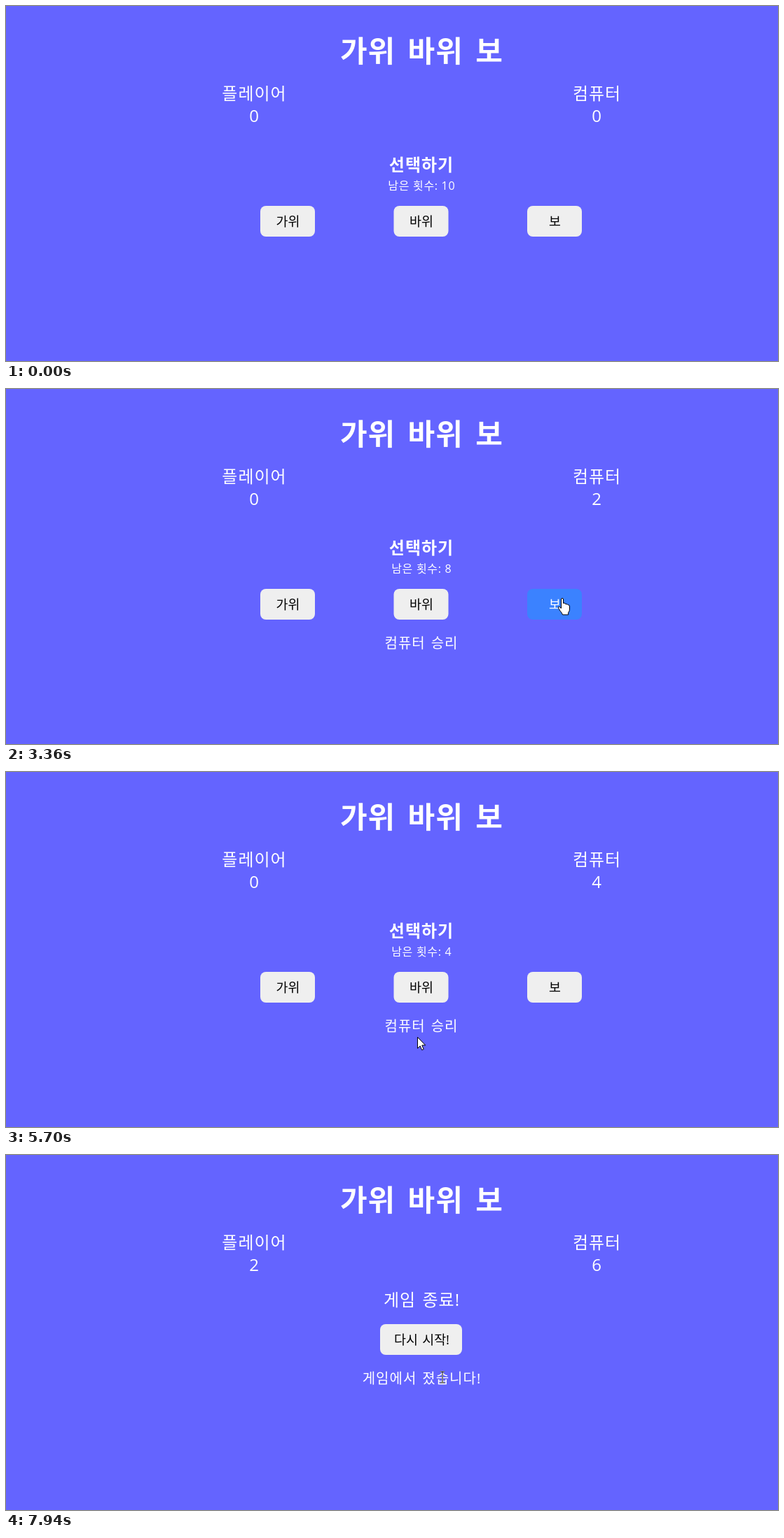
An HTML page that plays this animation: 1102 by 508 pixels, repeating every 8000 ms.

```html
<!DOCTYPE html>
<html lang="ko">
<head>
<meta charset="utf-8">
<title>가위 바위 보</title>
<style>
  html, body { margin: 0; width: 100%; height: 100%; overflow: hidden; background: #6464ff; }
  svg { display: block; width: 100vw; height: 100vh; }
  text {
    font: 24px "Open Sans", "Noto Sans CJK KR", "Noto Sans CJK", sans-serif;
    letter-spacing: 1px; word-spacing: .09em; text-anchor: middle; fill: #fff;
  }
  text.title { font-size: 42px; font-weight: 700; word-spacing: .13em; }
  text.heading { font-weight: 700; }
  text.small { font-size: 16px; letter-spacing: .7px; word-spacing: 0; }
  text.message { font-size: 20px; }
  text.label { font-size: 18.4px; letter-spacing: 0; fill: #000; }
  .button rect { fill: #efefef; }
  .button.hover rect { fill: #3b82ff; }
  .button.hover text { fill: #fff; }
  .pointer { fill: #fff; stroke: #000; stroke-linejoin: round; }
  #beam { fill: none; stroke: #fff; mix-blend-mode: difference; }
</style>
</head>
<body>
<svg viewBox="0 0 1102 508">
  <rect width="1102" height="508" fill="#6464ff"/>
  <text class="title" x="593.4" y="79.5">가위 바위 보</text>
  <text x="354.5" y="134">플레이어</text>
  <text x="843.5" y="134">컴퓨터</text>
  <text id="player" x="354.5" y="166">0</text>
  <text id="computer" x="843.5" y="166">0</text>

  <g id="play">
    <text class="heading" x="593" y="236">선택하기</text>
    <text class="small" id="left" x="593.3" y="263"></text>
    <g class="button"><rect x="363" y="286" width="78" height="44" rx="8"/><text class="label" x="402.5" y="315">가위</text></g>
    <g class="button"><rect x="553.5" y="286" width="78" height="44" rx="8"/><text class="label" x="593" y="315">바위</text></g>
    <g class="button"><rect x="744" y="286" width="78" height="44" rx="8"/><text class="label" x="783.5" y="315">보</text></g>
    <text class="message" id="result" x="593" y="370.5"></text>
  </g>

  <g id="end">
    <text x="593.5" y="216">게임 종료!</text>
    <g class="button"><rect x="534" y="242" width="117" height="44" rx="8"/><text class="label" x="593.5" y="271">다시 시작!</text></g>
    <text class="message" x="593.5" y="327">게임에서 졌습니다!</text>
  </g>

  <g id="cursor">
    <circle id="click" r="12" fill="#ff0" fill-opacity=".45"/>
    <path id="arrow" class="pointer" d="M.5 .5V16.5L4.2 13L6.6 18.8L9.2 17.7L6.8 12H11.7Z"/>
    <path id="hand" class="pointer" d="M-1.5 1Q-1.5 -.5 0 -.5Q1.5 -.5 1.5 1V6.5Q4.5 5.5 5 8Q7.5 7 8.3 9Q10.5 8.5 10.5 11V15Q10.5 18 8.7 20V23H.5Q-.5 20 -3 17.5Q-4.5 15 -5.7 13Q-5.3 10.5 -3.3 12L-1.5 14Z"/>
    <path id="beam" d="M-3 -8H-1L0 -7L1 -8H3M0 -7V7M-3 8H-1L0 7L1 8H3"/>
  </g>
</svg>

<script>
const LOOP = 8000, APPEAR = 290, GAME_OVER = 7840, HOVER_LAG = 50;
const $ = id => document.getElementById(id);

// Each move: start, end, x, y, dip below the straight line
const start = { x: 646, y: 386 };
const moves = [
  [290, 810, 406, 311, 0],
  [1670, 2070, 608, 310, 30],
  [2690, 2990, 788, 305, 68],
  [3210, 3310, 794, 300, 0],
  [3680, 4010, 605, 323, 102],
  [4060, 4160, 601, 317, 0],
  [4510, 4800, 780, 310, 50],
  [5030, 5350, 400, 318, 76],
  [5550, 5850, 770, 312, 64],
  [6080, 6270, 605, 318, 55],
  [6650, 6950, 410, 324, 28],
  [7300, 7590, 623, 318, 65]
];

// Each round: press, outcome, player score, computer score, message
const COMPUTER = '컴퓨터 승리', PLAYER = '플레이어 승리', DRAW = '무승부';
const rounds = [
  [1320, 1470, 0, 1, COMPUTER],
  [2290, 2440, 0, 2, COMPUTER],
  [3460, 3610, 0, 2, DRAW],
  [4330, 4430, 0, 3, COMPUTER],
  [4850, 4950, 0, 3, DRAW],
  [5400, 5500, 0, 4, COMPUTER],
  [5900, 6000, 1, 4, PLAYER],
  [6370, 6470, 1, 5, COMPUTER],
  [7090, 7190, 2, 5, PLAYER],
  [7740, GAME_OVER, 2, 6, '']
];

const buttons = [...document.querySelectorAll('#play .button')].map(group => (
  { group, x: group.firstChild.x.baseVal.value }
));

const show = (id, on) => $(id).setAttribute('visibility', on ? 'visible' : 'hidden');
const setText = (id, value) => { if ($(id).textContent !== String(value)) $(id).textContent = value; };
const within = (p, x, y, w, h) => p.x >= x && p.x <= x + w && p.y >= y && p.y <= y + h;

function cursorAt(t) {
  if (t < APPEAR) return null;
  let p = start;
  for (const [from, to, x, y, dip] of moves) {
    if (t < from) break;
    const u = Math.min(1, (t - from) / (to - from));
    const s = u * u * (3 - 2 * u);
    p = { x: p.x + (x - p.x) * s, y: p.y + (y - p.y) * s + dip * 4 * s * (1 - s) };
  }
  return p;
}

function isOver(button, t) {
  const p = cursorAt(t);
  return p !== null && within(p, button.x, 286, 78, 44);
}

function render(t) {
  const done = rounds.filter(round => t >= round[1]);
  const [, , player, computer, message] = done.at(-1) || [0, 0, 0, 0, ''];
  const over = t >= GAME_OVER;
  setText('player', player);
  setText('computer', computer);
  setText('left', `남은 횟수: ${10 - done.length}`);
  setText('result', message);
  show('play', !over);
  show('end', over);

  for (const button of buttons) {
    button.group.classList.toggle('hover', isOver(button, t - HOVER_LAG));
  }

  const p = cursorAt(t);
  const onButton = p && !over && buttons.some(b => isOver(b, t));
  const onText = p && (over ? within(p, 508, 306, 170, 27)
                            : message && within(p, 541, 350, 104, 27));
  show('arrow', p && !onButton && !onText);
  show('hand', onButton);
  show('beam', onText);
  show('click', rounds.some(([press, outcome]) => t >= press && t < outcome));
  if (p) {
    const place = `translate(${Math.round(p.x)} ${Math.round(p.y)})`;
    for (const part of $('cursor').children) part.setAttribute('transform', place);
  }
}

const begun = performance.now();
function tick() {
  render((performance.now() - begun) % LOOP);
  requestAnimationFrame(tick);
}
tick();
</script>
</body>
</html>
```
